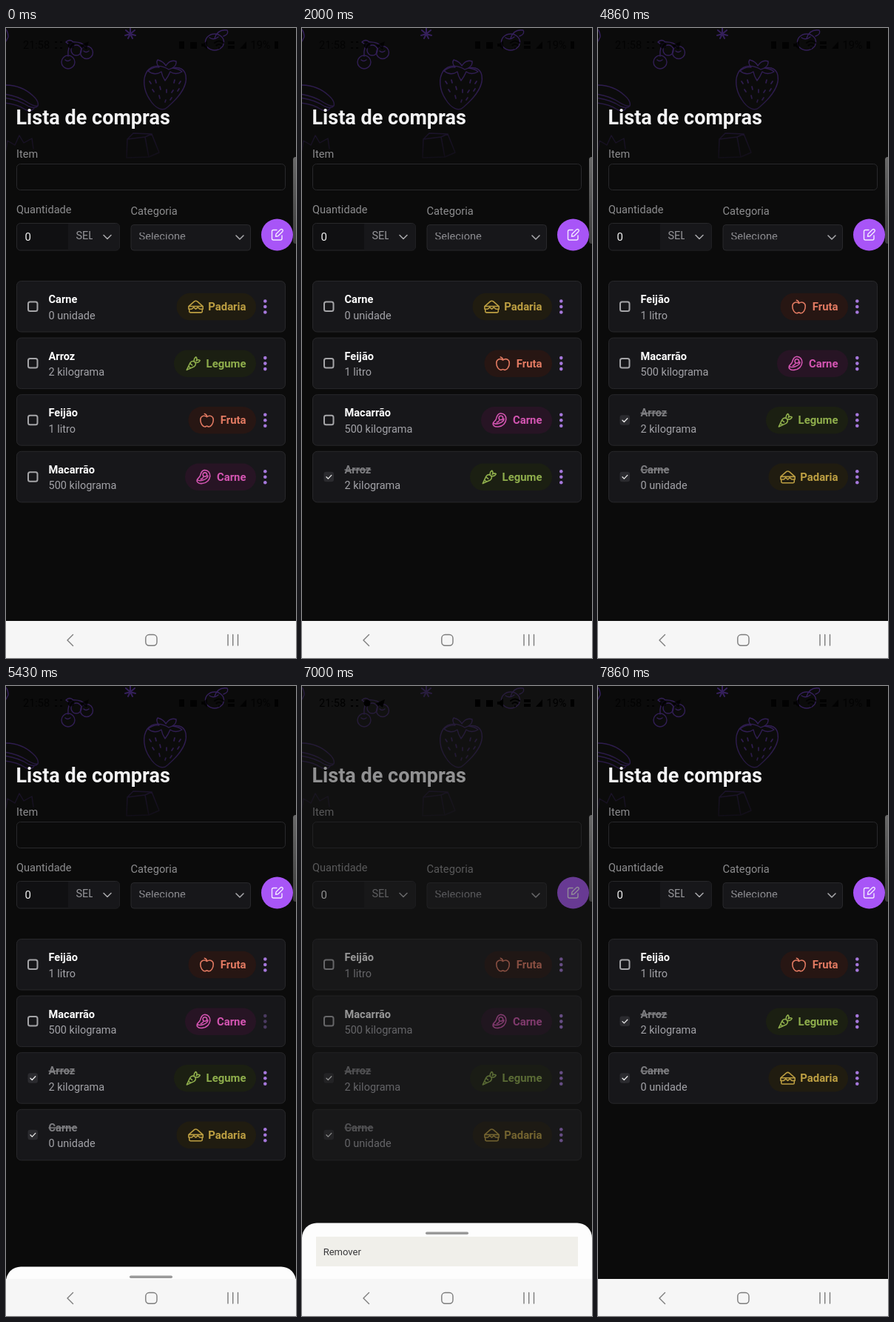
Animation of 392x850 px, one loop 8000 ms. Source, as an HTML page:

```html
<!DOCTYPE html>
<html lang="pt">
<head>
<meta charset="utf-8">
<title>Lista de compras</title>
<style>
  html, body { margin: 0; width: 100%; height: 100%; overflow: hidden; background: #0b0b0b; }
  svg { display: block; width: 392px; height: 850px; font-family: Roboto, sans-serif; font-size: 14.5px; }
  .line { fill: none; stroke-linecap: round; stroke-linejoin: round; }
  .bold { font-weight: 700; }
  .label { fill: #8c8c8e; }
  .box { stroke: #28282b; }
</style>
</head>
<body>
<svg viewBox="0 0 392 850">
  <defs>
    <linearGradient id="fade" x1="0" y1="0" x2="0" y2="1">
      <stop offset="0" stop-color="#0b0b0b" stop-opacity="0"/>
      <stop offset=".42" stop-color="#0b0b0b" stop-opacity=".15"/>
      <stop offset="1" stop-color="#0b0b0b" stop-opacity=".95"/>
    </linearGradient>
    <linearGradient id="edge" x1="0" y1="0" x2="0" y2="1">
      <stop offset="0" stop-color="#686868"/>
      <stop offset="1" stop-color="#3c3c3c"/>
    </linearGradient>
    <clipPath id="clipSel"><rect x="90" y="270" width="27" height="25"/></clipPath>
    <clipPath id="clipCat"><rect x="175" y="276" width="90" height="9.2"/></clipPath>
    <clipPath id="screen"><rect width="392" height="801"/></clipPath>
  </defs>
  <rect width="392" height="850" fill="#0b0b0b"/>

  <g class="line" stroke="#35205c" stroke-width="1.4">
    <!-- strawberry -->
    <path d="M191 58C184 68 186 84 194 96C202 109 212 113 218 107C230 97 246 80 243 64C241 53 229 51 220 56C211 50 198 49 191 58Z"/>
    <path d="M192 58Q199 52 207 53Q202 47 205 43Q213 45 216 51Q222 42 230 45Q231 50 225 54Q234 55 238 59Q229 64 222 59Q219 66 215 71Q211 65 210 59Q201 65 192 58Z"/>
    <path d="M194 72l2 3M202 70l1 4M198 83l2 3M208 79l1 4M207 91l1 4M217 83v4M228 70l-1 4M236 72l-2 3M226 84l-2 3M216 97l-1 3M224 94l-2 3M234 82l-2 3" stroke-width="1.7"/>
    <!-- cherries -->
    <circle cx="84" cy="46" r="9"/><circle cx="109" cy="33" r="8.5"/><circle cx="95" cy="30" r="7"/>
    <path d="M84 38Q83 25 90 19Q101 18 108 25M80 43q3 3 7 0M105 31q3 3 7 0M81 19Q86 14 91 19Q86 24 81 19"/>
    <ellipse cx="282" cy="19" rx="12.5" ry="11"/>
    <path d="M275 13Q281 17 287 12M282 14Q286 1 299 3Q302 8 294 11"/>
    <path d="M168 8V0M168 8l-6-5M168 8l6-5M168 8l-7 2M168 8l7 2M168 8l-3 6M168 8l3 6" stroke-width="2"/>
    <path d="M0 2Q3 6 3 12L0 18"/>
    <!-- sandwich, milk and crown -->
    <path d="M-4 77Q20 76 36 91Q45 99 43 105Q38 106 30 101Q15 91-4 89M-4 94Q16 96 31 106Q40 109 43 105M-4 101Q14 102 26 110Q34 114 38 108"/>
    <path d="M164 150L188 147L193 174L163 175ZM164 150L172 142L197 143L188 147M197 143L207 168L193 174"/>
    <path d="M0 165L2 152L12 158L18 145L24 155L35 149L37 163"/>
  </g>
  <rect width="392" height="190" fill="url(#fade)"/>

  <text class="bold" x="13.5" y="129.5" font-size="27" fill="#f4f4f5">Lista de compras</text>
  <text class="label" x="14" y="175">Item</text>
  <rect class="box" x="14.5" y="183.5" width="363" height="35" rx="5" fill="none"/>
  <text class="label" x="14" y="250.3" font-size="14.6">Quantidade</text>
  <text class="label" x="168.5" y="252.3" font-size="14.7">Categoria</text>
  <rect class="box" x="14.5" y="263.5" width="139" height="36.5" rx="5" fill="#101012"/>
  <path d="M84 264H149a4.5 4.5 0 0 1 4.5 4.5V295a4.5 4.5 0 0 1-4.5 4.5H84Z" fill="#17171a"/>
  <text x="25.5" y="287" font-size="15" fill="#f0f0f0">0</text>
  <g clip-path="url(#clipSel)"><text x="94.5" y="285.3" fill="#96969a">SELECIONE</text></g>
  <rect class="box" x="169" y="265.5" width="161.5" height="34.5" rx="4" fill="#17171a"/>
  <g clip-path="url(#clipCat)"><text x="179.5" y="285.5" font-size="14.7" fill="#8d8d91">Selecione</text></g>
  <path class="line" d="M132 279.5l5 5 5-5M311 280l5 5 5-5" stroke="#aaaaad" stroke-width="1.5"/>
  <circle cx="366.5" cy="279" r="21.5" fill="#a855f7"/>
  <path class="line" d="M366 272.5H361.5Q359.5 272.5 359.5 274.5V284Q359.5 286 361.5 286H371Q373 286 373 284V280M364.5 281.2L365 278L371 272Q372.5 270.8 373.7 272Q375 273.3 373.7 274.7L367.7 280.7Z" stroke="#f4eaff" stroke-width="1.4"/>

  <g id="list"></g>
  <rect id="shade" width="392" height="801" fill="#1a1a1a"/>

  <g id="status" fill="#000">
    <text x="23" y="28">21:58</text>
    <path d="M66 18h3v2h-3zM73 18h3v2h-3zM66 26h3v2h-3zM73 26h3v2h-3zM99 24l13-6-3 11-4-3-2 2-1-3z"/>
    <circle cx="88" cy="23" r="4.5"/>
    <path d="M234 18h7v10h-7zM249 19h9v9h-9zM264 21h3l5-4v12l-5-4h-3zM300 18h9v4h-9zM300 24h9v4h-9zM316 28h9V18zM363 18h5v10h-5z"/>
    <path class="line" d="M282 20q6-5 12 0M284.5 23.5q3.500-3 7 0M288 27v.5" stroke="#000" stroke-width="2"/>
    <text x="330.5" y="28">19%</text>
  </g>
  <rect x="388" y="174" width="10" height="117" rx="3.5" fill="url(#edge)"/>

  <g clip-path="url(#screen)"><g id="sheet">
    <rect y="-.5" width="392" height="120" rx="20" fill="#fdfdfd"/>
    <rect x="167" y="11.5" width="58" height="3.5" rx="1.7" fill="#999"/>
    <rect id="press" x="19" y="18" width="354" height="40" fill="#f0efea"/>
    <text x="28.7" y="43" font-size="13" fill="#38383a">Remover</text>
  </g></g>

  <rect y="800" width="392" height="50" fill="#f6f6f6"/>
  <g class="line" stroke="#7c7c7c" stroke-width="1.4">
    <path d="M90.5 818.5L83 826L90.5 833.5M300 818.5V833M306.7 818.5V833M313.5 818.5V833"/>
    <rect x="188.8" y="818.5" width="15.2" height="14.8" rx="4.8"/>
  </g>
</svg>
<script>
const LOOP = 8000;
const $ = id => document.getElementById(id);

// kind: colour, pill fill, pill left edge, icon centre, icon path
const kinds = {
  Padaria: ['#bd9f42', '#201c10', 230.5, 256.5, 'M1.500 11.500L9.500 4.500Q12 2.500 14.500 4.500L22.500 11.500ZM1.500 11.500V15.500H6L9 13L12 15.500L15 13L18 15.500H22.500V11.500M2.500 15.500V19Q2.500 20.500 4 20.500H20Q21.500 20.500 21.500 19V15.500'],
  Legume: ['#8fae4c', '#1b1f12', 227, 253, 'M2.500 21.500L7.500 11Q10 7 14 9.500Q17.500 13 13.500 16.500ZM7.500 12l3 2.500M13.500 9Q12.500 4.500 16 2.500Q18.500 5 16.500 8M15.500 10.500Q20 11.500 22 7.500Q19.500 5.500 16.500 8M6 17l2 1.500'],
  Fruta: ['#e27a62', '#271613', 246.5, 271.5, 'M12 7C8 4 2.500 5.500 2.500 11.500C2.500 17 6 21.500 9 21.500C10.500 21.500 11 20.500 12 20.500C13 20.500 13.500 21.500 15 21.500C18 21.500 21.500 17 21.500 11.500C21.500 5.500 16 4 12 7ZM12 7C12 4.500 10.500 3 8.500 2.500'],
  Carne: ['#d455b2', '#271424', 242, 267, 'M13 2C19 1.500 22 6 21.500 11C21 16 17 21 10 21.500C4 22 1.500 19 2.500 16C3.500 13.500 6 13 7 10C8 6 9 2.500 13 2ZM11 8.500a3 3 0 1 0 6 0a3 3 0 1 0-6 0M2.500 16C6 19 18 16 18.500 10M11.500 12.500q-1 2-3.500 2.500']
};

// name, amount, kind
const items = {
  c: ['Carne', '0 unidade', 'Padaria'],
  a: ['Arroz', '2 kilograma', 'Legume'],
  f: ['Feijão', '1 litro', 'Fruta'],
  m: ['Macarrão', '500 kilograma', 'Carne']
};

// time, order; capitals are ticked
const orders = [[0, 'cafm'], [860, 'cfmA'], [2290, 'fmAC'], [7430, 'fAC']];
// time, sheet top, shade strength
const sheets = [[0, 802, 0], [5430, 784, 0], [5570, 740, .65], [5710, 725, 1], [7290, 766, .4], [7430, 802, 0]];
// time, opacity of the menu dots on the pressed row
const dims = [[0, 1], [5140, .5], [5290, .25], [5430, .36], [5570, .75], [5710, 1]];
const presses = [[0, 0], [6860, 1], [7290, 0]];

const at = (steps, t) => steps.filter(s => s[0] <= t).pop();

function row(key, i) {
  const done = key < 'a';
  const id = key.toLowerCase();
  const [name, amount, kind] = items[id];
  const [color, fill, left, mid, icon] = kinds[kind];
  const box = done
    ? `<rect x="29.5" y="27.5" width="13.5" height="13.5" rx="3" fill="#2b2b2f"/>
       <path class="line" d="M33 34.500l2.300 2.300 4.500-4.700" stroke="#e8e8e8" stroke-width="1.3"/>`
    : `<rect class="line" x="30" y="28" width="12.5" height="12.5" rx="2.5" stroke="#a5a5a8" stroke-width="2"/>`;
  return `<g transform="translate(0 ${341.5 + i * 76.6})">
    <rect x="14.5" y="0" width="363" height="68.5" rx="6" fill="#17171a" stroke="#28282b"/>
    ${box}
    <text class="bold" x="57.5" y="29.5" font-size="14.6" fill="${done ? '#7d7d80' : '#fff'}"
      ${done ? 'text-decoration="line-through"' : ''}>${name}</text>
    <text x="57.5" y="51" fill="#a2a2a7">${amount}</text>
    <rect x="${left}" y="16.3" width="${338 - left}" height="36.5" rx="18.2" fill="${fill}"/>
    <path class="line" transform="translate(${mid - 11} 23.5) scale(.92)" d="${icon}" stroke="${color}" stroke-width="1.7"/>
    <text class="bold" x="324.5" y="39.8" font-size="14.9" text-anchor="end" fill="${color}">${kind}</text>
    <g class="dots-${id}" fill="#a678dc">${[27, 34.5, 42].map(y => `<circle cx="350.3" cy="${y}" r="2.3"/>`).join('')}</g>
  </g>`;
}

let shown = '';
function draw(t) {
  const order = at(orders, t)[1];
  if (order !== shown) {
    $('list').innerHTML = [...order].map(row).join('');
    shown = order;
  }
  const [, top, shade] = at(sheets, t);
  $('sheet').setAttribute('transform', `translate(0 ${top})`);
  $('shade').setAttribute('opacity', .45 * shade);
  $('status').setAttribute('opacity', .75 + .25 * shade);
  $('press').setAttribute('opacity', at(presses, t)[1]);
  const dots = document.querySelector('.dots-m');
  if (dots) dots.setAttribute('opacity', at(dims, t)[1]);
}

const start = performance.now();
function tick() {
  draw((performance.now() - start) % LOOP);
  requestAnimationFrame(tick);
}
tick();
</script>
</body>
</html>
```
